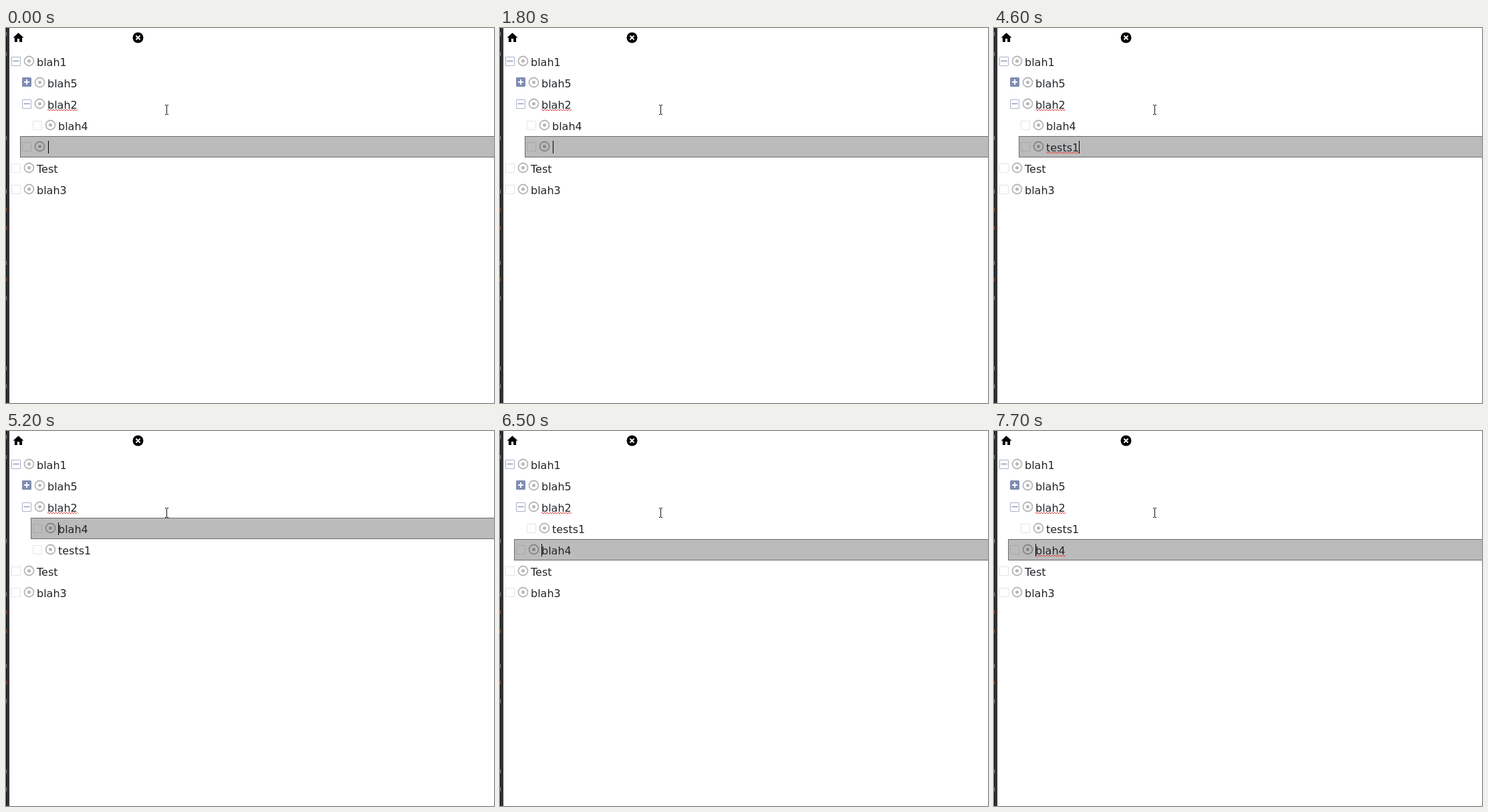
Recreate the animation shown at these times as an HTML page. Size 730x562 px, loop 8000 ms.

```html
<!DOCTYPE html>
<html lang="en">
<head>
<meta charset="utf-8">
<title>Outline editor</title>
<style>
  html, body { margin: 0; width: 100%; height: 100%; overflow: hidden; background: #fff; }
  svg { display: block; }
  text { font: 16px "DejaVu Sans", sans-serif; fill: #212529; }
</style>
</head>
<body>
<svg width="730" height="562" viewBox="0 0 730 562">
  <defs>
    <pattern id="wave" width="4" height="2" patternUnits="userSpaceOnUse">
      <path d="M0 1.5H2M2 .5H4" stroke="#e0403c"/>
    </pattern>
  </defs>
  <rect width="5" height="562" fill="#1d1e20"/>
  <rect x="2" width="2" height="562" fill="#3a3d41"/>
  <g id="specks"></g>
  <path transform="translate(8.9 4.9) scale(.8)" d="M10 20v-6h4v6h5v-8h3L12 3 2 12h3v8z"/>
  <circle cx="197.5" cy="14.5" r="8"/>
  <path d="M194.5 11.5l6 6m0-6l-6 6" stroke="#fff" stroke-width="2"/>
  <g id="tree"></g>
  <path d="M238 115.5h2m1 0h2M240.5 116v13M238 129.5h2m1 0h2" stroke="#111" fill="none"/>
</svg>
<script>
const LOOP = 8000, ROW = 32, TOP = 34;
const tree = document.getElementById('tree');

document.getElementById('specks').innerHTML =
  [9, 39, 165, 245, 352, 405, 510, 537].map(y => `<rect y="${y - 3}" width="1" height="6" fill="#85888c"/>`).join('') +
  [272, 300, 377].map(y => `<rect y="${y - 3}" width="1" height="6" fill="#8a4a2c"/>`).join('');

// Each step changes part of the state: sel = active row, a/b = texts of rows 3 and 4
const steps = [
  [0, { sel: 4, a: 'blah4', b: '', depth: 1, caret: true, home: false, wavy: false }],
  [300, { caret: false }],
  [600, { caret: true, depth: 2 }],
  [1200, { caret: false }],
  [1800, { caret: true }],
  [2400, { caret: false }],
  [2500, { caret: true, b: 't' }],
  [2700, { b: 'te' }],
  [2800, { b: 'test' }],
  [2900, { b: 'tests' }],
  [3400, { b: 'tests1' }],
  [4000, { caret: false }],
  [4400, { wavy: true }],
  [4600, { caret: true }],
  [5200, { sel: 3, home: true, wavy: false }],
  [5400, { wavy: true }],
  [5900, { caret: false }],
  [6500, { sel: 4, a: 'tests1', b: 'blah4', depth: 1, caret: true, wavy: false }],
  [6900, { wavy: true }],
  [7100, { caret: false }],
  [7700, { caret: true }]
];

const pen = document.createElement('canvas').getContext('2d');
pen.font = '16px "DejaVu Sans", sans-serif';
const textWidth = s => pen.measureText(s).width;

function toggle(kind) {
  if (kind === '+') return `<rect x="8" y="8" width="14" height="14" rx="1.5" fill="#7f8db1"/>
    <path d="M11 15h8M15 11v8" stroke="#fff" stroke-width="2"/>`;
  if (kind === '-') return `<rect x="8.5" y="9.5" width="13" height="13" rx=".5" fill="none" stroke="#a9b1cb"/>
    <path d="M10.5 15.5h9" stroke="#8e99bc" stroke-width="1.5"/>`;
  return `<rect x="8.5" y="9.5" width="13" height="13" rx=".5" fill="none" stroke="#000" stroke-opacity=".1"/>`;
}

function row(i, depth, text, kind, active, s) {
  const wide = textWidth(text);
  const wavy = i === 2 || active && s.wavy;
  const caretX = text ? Math.floor(46 + (s.home ? 0 : wide)) : 47;
  return `<g transform="translate(${depth * 16} ${TOP + i * ROW})">
    ${active ? '<rect x="5.5" y=".5" width="800" height="31" fill="#bbb" stroke="#6b6b6b"/>' : ''}
    ${toggle(kind)}
    <g opacity=".28"><circle cx="34.5" cy="15.5" r="7" fill="none" stroke="#000" stroke-width="1.8"/>
    <circle cx="34.5" cy="15.5" r="2.5"/></g>
    <text x="46" y="23">${text}</text>
    ${wavy ? `<rect x="46" y="24" width="${Math.ceil(wide)}" height="2" fill="url(#wave)"/>` : ''}
    ${active && s.caret ? `<rect x="${caretX}" y="7" width="1" height="19"/>` : ''}
  </g>`;
}

function draw(s) {
  tree.innerHTML = [
    [0, 'blah1', '-'],
    [1, 'blah5', '+'],
    [1, 'blah2', '-'],
    [2, s.a],
    [s.depth, s.b],
    [0, 'Test'],
    [0, 'blah3']
  ].map(([depth, text, kind], i) => row(i, depth, text, kind, i === s.sel, s)).join('');
}

let shown = 0;
function frame(now) {
  const t = now % LOOP;
  const count = steps.filter(([at]) => at <= t).length;
  if (count !== shown) {
    shown = count;
    draw(Object.assign({}, ...steps.slice(0, count).map(step => step[1])));
  }
  requestAnimationFrame(frame);
}
frame(0);
</script>
</body>
</html>
```
